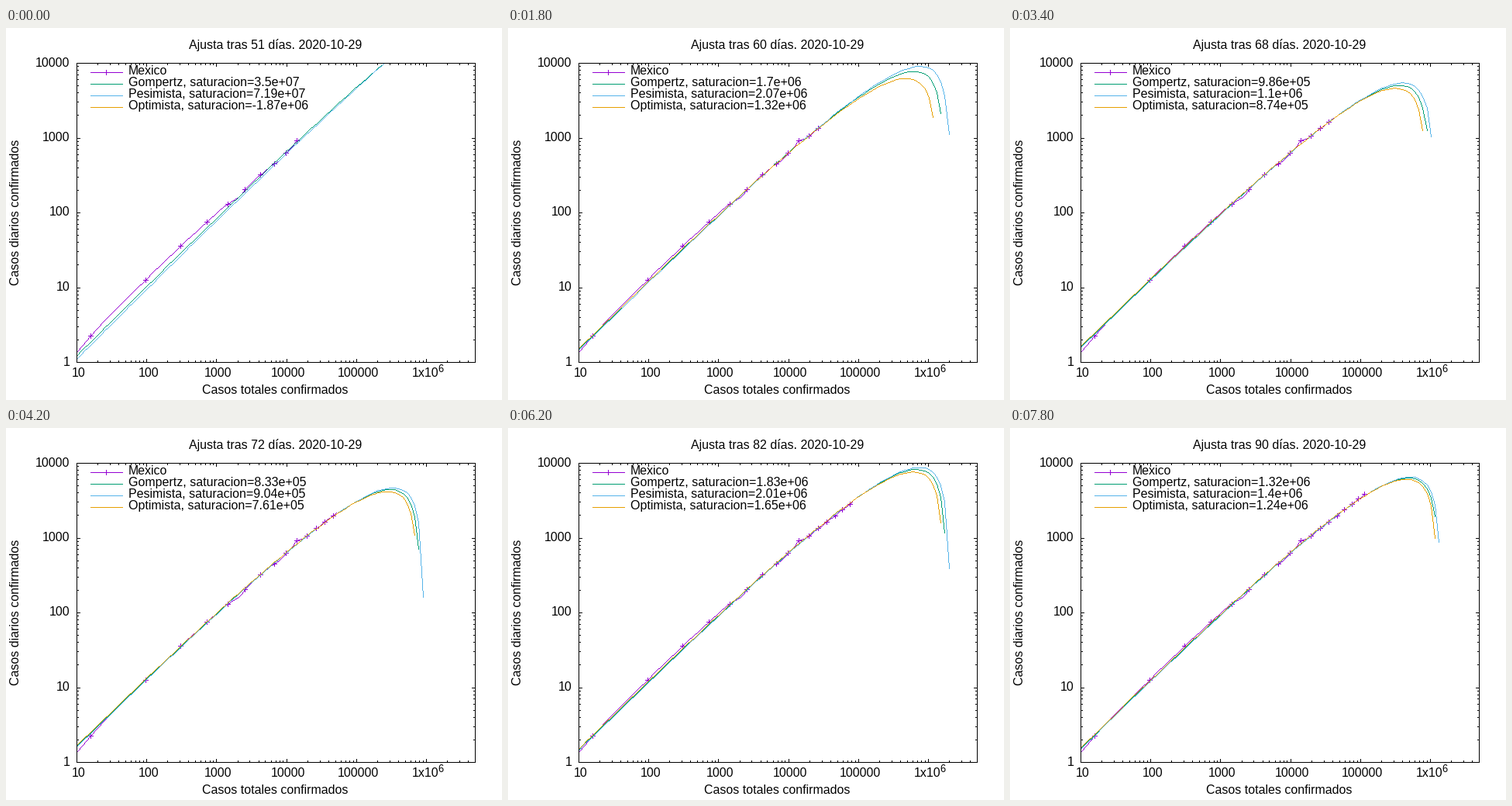
Recreate the animation shown at these times as a matplotlib script. Size 640 by 480 pixels, loop 8 s.

```python
import numpy as np
import matplotlib.pyplot as plt
from matplotlib.animation import FuncAnimation

plt.rcParams["font.family"] = "Liberation Sans"
plt.rcParams["text.hinting"] = "default"

W, H, DPI = 640, 480, 100
LEFT, RIGHT, TOP, BOTTOM = 91, 605, 45, 431
XMAX = 5e6
FIRST_DAY, FRAMES, STEP_MS = 51, 40, 200
BLACK = (0, 0, 0)
PURPLE, GREEN, BLUE, GOLD = (148, 0, 211), (0, 158, 115), (86, 180, 233), (230, 159, 0)

# turning points of the fit: day, saturation and pessimistic saturation in millions
KEY_DAYS = (51, 56, 64, 72, 78, 82, 90)
KEY_MID = (35.015, 2.84, 1.209, 0.8326, 1.376, 1.83, 1.32)
KEY_HIGH = (71.9, 4.0, 1.4, 0.904, 1.51, 2.01, 1.4)

# dips in the reported cases: day, depth in pixels
DIPS = ((0, 60), (28, 5), (42, 2.5), (50, -4))


def to_px(x):
    return LEFT + (np.log10(x) - 1) / np.log10(XMAX / 10) * (RIGHT - LEFT)


def to_py(y):
    return BOTTOM - np.log10(y) / 4 * (BOTTOM - TOP)


def stroke(img, xs, ys, color):
    """Draw a one pixel wide polyline, clipped to the plot."""
    xs, ys = (np.floor(np.asarray(v) + 0.5).astype(int) for v in (xs, ys))
    for x0, y0, x1, y1 in zip(xs, ys, xs[1:], ys[1:]):
        n = max(abs(x1 - x0), abs(y1 - y0)) + 1
        px = np.floor(np.linspace(x0, x1, n) + 0.5).astype(int)
        py = np.floor(np.linspace(y0, y1, n) + 0.5).astype(int)
        ok = (px >= LEFT) & (px <= RIGHT) & (py >= TOP) & (py <= BOTTOM)
        img[py[ok], px[ok]] = color


def plus(img, x, y):
    stroke(img, (x - 3, x + 3), (y, y), PURPLE)
    stroke(img, (x, x), (y - 3, y + 3), PURPLE)


def draw_border(img):
    stroke(img, (LEFT, RIGHT, RIGHT, LEFT, LEFT), (TOP, TOP, BOTTOM, BOTTOM, TOP), BLACK)
    for decade in range(7):
        for m in range(1, 10):
            size = 4 if m == 1 else 2
            v = m * 10.0 ** decade
            if 10 <= v <= XMAX:
                x = to_px(v)
                stroke(img, (x, x), (BOTTOM, BOTTOM - size), BLACK)
                stroke(img, (x, x), (TOP, TOP + size), BLACK)
            if v <= 1e4:
                y = to_py(v)
                stroke(img, (LEFT, LEFT + size), (y, y), BLACK)
                stroke(img, (RIGHT, RIGHT - size), (y, y), BLACK)


def draw_key(img):
    for row, color in enumerate((PURPLE, GREEN, BLUE, GOLD)):
        y = 57 + 15 * row
        stroke(img, (109, 150), (y, y), color)
    plus(img, 129, 57)


def draw_cases(img, day):
    """Growth that slows down with time, marked every fifth day."""
    days = np.arange(4, day + 1)
    u = np.log2(days / 5)
    x = 108.5 + 67 * u + 4 * u ** 2
    v = x - 109
    y = 395.5 - 1.035 * v + 0.000415 * v ** 2
    for center, depth in DIPS:
        y += depth * np.exp(-((days - center) / 2.5) ** 2)
    stroke(img, x, y, PURPLE)
    for mx, my in zip(x[1::5], y[1::5]):
        plus(img, mx, my)


def draw_gompertz(img, rate, sat, color):
    x = np.logspace(1, np.log10(XMAX), 100)
    x = x[x < sat]
    if len(x):
        stroke(img, to_px(x), to_py(rate * x * np.log(sat / x)), color)


def fit(day):
    """Rate and saturation of the fitted, pessimistic and optimistic curves."""
    mid, high = (1 / np.interp(day, KEY_DAYS, 1 / np.array(k)) for k in (KEY_MID, KEY_HIGH))
    u = np.log(mid)
    rate = 1 / (72 + 16.6 * u - 0.6 * u ** 2)
    spread = rate * (0.02 + 0.11 * (high / mid - 1))
    return ((rate, mid * 1e6), (rate - spread, high * 1e6),
            (rate + spread, (2 * mid - high) * 1e6))


fig = plt.figure(figsize=(W / DPI, H / DPI), dpi=DPI, facecolor="white")
ax = fig.add_axes((0, 0, 1, 1))
ax.axis("off")
blank = np.full((H, W, 3), 255, np.uint8)
canvas = ax.imshow(blank, interpolation="nearest", aspect="auto")


def label(x, y, s, ha="center", px=16, **kw):
    return ax.text(x, y, s, ha=ha, va="baseline", fontsize=px * 72 / DPI,
                   color="black", **kw)


title = label(347, 27, "")
label(347, 472, "Casos totales confirmados")
label(17, 237, "Casos diarios confirmados", rotation=90, rotation_mode="anchor")
for p in range(5):
    label(82, to_py(10.0 ** p) + 4, str(10 ** p), "right")
for p in range(1, 6):
    label(to_px(10.0 ** p) + 2, 450, str(10 ** p))
label(523, 450, "1x10", "left")
label(557, 444, "6", "left", 12.8)
label(157, 60, "Mexico", "left")
NAMES = ("Gompertz", "Pesimista", "Optimista")
entries = [label(157, 75 + 15 * i, "", "left") for i in range(3)]


def update(frame):
    day = FIRST_DAY + frame
    img = blank.copy()
    draw_key(img)
    draw_cases(img, day)
    for name, entry, color, (rate, sat) in zip(NAMES, entries, (GREEN, BLUE, GOLD), fit(day)):
        draw_gompertz(img, rate, sat, color)
        entry.set_text(f"{name}, saturacion={sat:.3g}")
    draw_border(img)
    canvas.set_data(img)
    title.set_text(f"Ajusta tras {day} días. 2020-10-29")
    return [canvas, title, *entries]


anim = FuncAnimation(fig, update, frames=FRAMES, interval=STEP_MS, repeat=True,
                     repeat_delay=0, blit=False)
plt.show()
```
